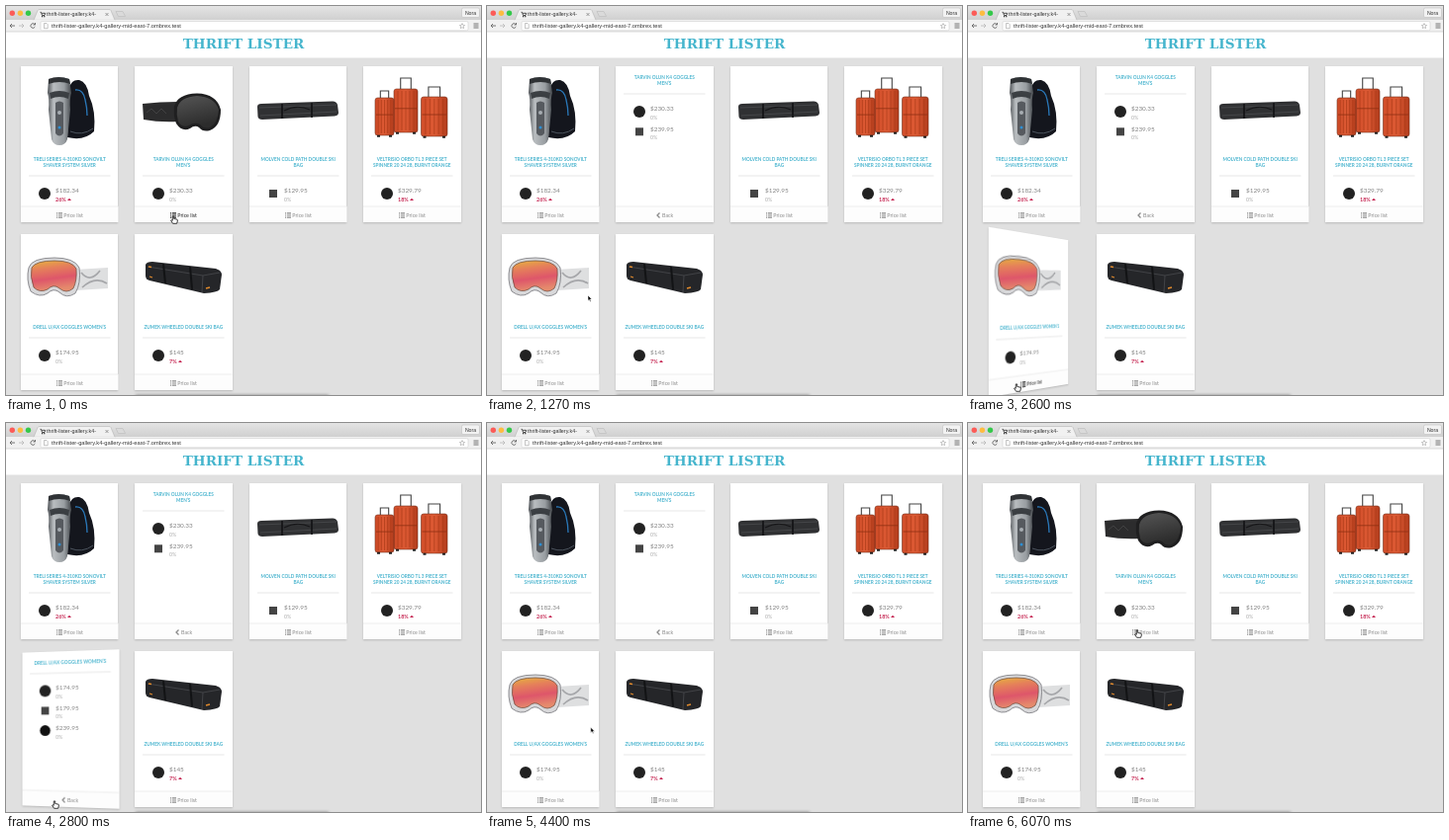
An HTML page for the animation above (6140 ms loop, 480 by 394 pixels).

```html
<!DOCTYPE html>
<html lang="en">
<head>
<meta charset="utf-8">
<title>Thrift Lister</title>
<style>
html, body { margin: 0; width: 100%; height: 100%; overflow: hidden; background: #e0e0e0; }
#stage { position: relative; width: 480px; height: 394px; overflow: hidden; }
svg { position: absolute; left: 0; top: 0; overflow: visible; }
.card { position: absolute; width: 98.5px; height: 158px; background: #fff; box-shadow: 0 .5px 2px rgba(0,0,0,.18); }
text { font-family: Lato, "Open Sans", sans-serif; }
.ui { font-family: "Liberation Sans", sans-serif; fill: #333; }
.head { font: bold 13.6px "DejaVu Serif", serif; fill: #45b5cd; text-anchor: middle; }
.name { font-size: 4.7px; font-weight: bold; fill: #4bb5cf; text-anchor: middle; }
.price { font-size: 6.4px; fill: #808080; }
.same { font-size: 5.2px; fill: #aaa; }
.up { font-size: 5.4px; font-weight: bold; fill: #c4224f; }
.link { fill: #8a8a8a; stroke: #8a8a8a; }
.link text { font-size: 5.3px; stroke: none; }
.hot .link { fill: #222; stroke: #222; }
</style>
</head>
<body>
<div id="stage">
<svg id="chrome" width="480" height="394">
  <defs>
    <linearGradient id="bar" x2="0" y2="1"><stop stop-color="#e4e4e4"/><stop offset="1" stop-color="#d0d0d0"/></linearGradient>
    <linearGradient id="steel"><stop stop-color="#4f5357"/><stop offset=".25" stop-color="#b9bdc0"/><stop offset=".7" stop-color="#989da1"/><stop offset="1" stop-color="#44484c"/></linearGradient>
    <linearGradient id="smoke" x2=".3" y2="1"><stop stop-color="#555"/><stop offset="1" stop-color="#2c2c2c"/></linearGradient>
    <linearGradient id="sunset" x2=".2" y2="1"><stop stop-color="#e6b43c"/><stop offset=".3" stop-color="#e5805a"/><stop offset=".65" stop-color="#de566a"/><stop offset="1" stop-color="#e58a6c"/></linearGradient>
    <linearGradient id="shell"><stop stop-color="#cf4c28"/><stop offset=".5" stop-color="#dd5a34"/><stop offset="1" stop-color="#b23c1c"/></linearGradient>
  </defs>
  <rect width="480" height="14" fill="url(#bar)"/>
  <rect y="14" width="480" height="12" fill="#f1f1f1"/>
  <rect y="26" width="480" height="26.500" fill="#fff"/>
  <path d="M0 26h480" stroke="#c4c4c4" stroke-width=".6"/>
  <circle cx="6.300" cy="7.200" r="2.700" fill="#fc5b57"/>
  <circle cx="14.400" cy="7.200" r="2.700" fill="#fdbc40"/>
  <circle cx="22.500" cy="7.200" r="2.700" fill="#34c84a"/>
  <path d="M28 14.300L32 4.500Q32.500 3.500 34 3.500H104Q105.500 3.500 106 4.500L110 14.300Z" fill="#f1f1f1" stroke="#aaa" stroke-width=".5"/>
  <path d="M28 14.500H110" stroke="#f1f1f1"/>
  <path d="M111 5.500h7l2.500 5h-7z" fill="#dadada" stroke="#b5b5b5" stroke-width=".5"/>
  <path d="M34.500 6.300h1l1 3.200h2.500l.7-2.200h-3.500" fill="none" stroke="#222" stroke-width=".8"/>
  <circle cx="36.600" cy="10.700" r=".6"/><circle cx="38.800" cy="10.700" r=".6"/>
  <text class="ui" x="41" y="10.400" font-size="5.400">thrift-lister-gallery.k4-</text>
  <path d="M100.500 7l3 3m0-3l-3 3" stroke="#777" stroke-width=".7"/>
  <rect x="460.500" y="2" width="18" height="9.500" rx="1.500" fill="#f2f2f2" stroke="#b8b8b8" stroke-width=".5"/>
  <text class="ui" x="469.500" y="8.700" font-size="5.200" text-anchor="middle">Nora</text>
  <g fill="none" stroke="#666" stroke-width=".9">
    <path d="M9 20H4m2-2l-2 2l2 2"/>
    <path d="M13 20h5m-2-2l2 2l-2 2" stroke="#bbb"/>
    <path d="M29 18.500A2.300 2.300 0 1 0 29.300 21M29.500 17v2h-2"/>
    <path d="M472.500 18h5m-5 2h5m-5 2h5"/>
  </g>
  <rect x="35" y="15.500" width="432" height="9.300" rx="1.500" fill="#fff" stroke="#c6c6c6" stroke-width=".5"/>
  <path d="M38.500 17.500h2.500l1.200 1.200v4h-3.700z" fill="#fff" stroke="#888" stroke-width=".5"/>
  <text class="ui" x="46" y="22.200" font-size="5.750">thrift-lister-gallery.k4-gallery-mid-east-7.ombrex.test</text>
  <path d="M461 17.600l.8 1.700 1.800.2-1.300 1.300.3 1.800-1.600-.9-1.600.9.3-1.800-1.300-1.300 1.800-.2z" fill="none" stroke="#888" stroke-width=".5"/>
  <text class="head" x="240" y="42.600">THRIFT LISTER</text>
</svg>
<div id="cards"></div>
<svg width="480" height="394">
  <path d="M131 395h195" stroke="#777" stroke-width="2" style="filter: blur(1.500px)"/>
  <g id="cursor" stroke="#fff" stroke-width=".6" stroke-linejoin="round">
    <path id="arrow" d="M0 0V5.500L1.300 4.400L2.200 6.400L3.200 6L2.300 4H4Z" fill="#000"/>
    <path id="hand" d="M-.7 0Q0-.7.7 0V2.500L4 3.200Q4.600 3.600 4.300 5L3.600 7.300H-.4L-2.400 4.200Q-2.200 3.300-.7 4.300Z" fill="#fff" stroke="#111" stroke-width=".8"/>
  </g>
</svg>
</div>
<script>
const LOOP = 6140, FLIP = 350;

const suitcase = (x, y, w, h, grip) => {
  let ribs = '';
  for (let i = 1; i < 6; i++) ribs += `M${x + w * i / 6} ${y + 2}v${h - 4}`;
  return `<path d="M${x + w * .28} ${y}v${-grip}h${w * .44}v${grip}" fill="none" stroke="#444" stroke-width="1.100"/>
    <rect x="${x}" y="${y}" width="${w}" height="${h}" rx="2.500" fill="url(#shell)" stroke="#74301c" stroke-width=".6"/>
    <path d="${ribs}" stroke="#a93a18" stroke-width=".7"/>
    <path d="M${x + 1} ${y + h * .45}h${w - 2}" stroke="#8e2f12" stroke-width=".8"/>
    <path d="M${x + 2} ${y + h + .8}h3m${w - 10} 0h3" stroke="#222" stroke-width="2"/>`;
};

const art = {
  shaver: `<path d="M49 22Q51 13 59 14Q67 16 69 30Q76 45 74 66Q64 76 47 72Z" fill="#14161d"/>
    <path d="M55 24Q63 23 65 34Q67 42 67 50" fill="none" stroke="#2a78b8" stroke-width="1.300"/>
    <path d="M50 66Q62 71 73 63" fill="none" stroke="#4c545e"/>
    <path d="M28 13Q38 9 49 13L51 27Q49 33 50 44L47 74Q45 80 39 80Q33 80 31 74L28 44Q29 33 27 27Z" fill="url(#steel)"/>
    <path d="M28 13Q38 9 49 13L50 18Q39 14 28 18Z" fill="#303336"/>
    <path d="M29 27Q39 23 49 27L48 33Q39 29 30 33Z" fill="#3b3f43"/>
    <path d="M35 37Q39 34 43 37L43 68Q39 73 35 68Z" fill="#565a5f"/>
    <circle cx="39" cy="47" r="2" fill="#a7adb2"/><circle cx="39" cy="62" r="1.500" fill="#2d8fd4"/>`,
  dark: `<path d="M8 38Q25 36 44 36V56Q25 57 9 54Z" fill="#2c2c2d"/>
    <path d="M12 47l5-4 5 5 5-5 5 5" fill="none" stroke="#424243"/>
    <path d="M40 41Q43 28 63 27.500Q83 28 87 44Q87 61 76 65Q69 67 65 62Q61 59 56 63Q48 67 42 58Q39 50 40 41Z" fill="#1f1f20"/>
    <path d="M43 42Q46 31 63 30Q81 31 85 44Q84 58 76 62Q70 64 66 59Q61 56 55 60Q48 63 44 56Q42 49 43 42Z" fill="url(#smoke)"/>`,
  flatBag: `<path d="M8 41Q8 38 12 38L84 35.500Q88 35.500 89 39L90 47Q90 50 86 50.500L13 54Q9 54 8.500 51Z" fill="#303133"/>
    <path d="M10 42L88 39M11 50L88 46" stroke="#505154" stroke-width=".7"/>
    <path d="M33 38v15M63 37v15" stroke="#161618" stroke-width="1.800"/>
    <path d="M35 45Q48 38 61 44" fill="none" stroke="#161618" stroke-width="1.200"/>`,
  cases: suitcase(31, 23, 24, 44, 11) + suitcase(12, 32, 19, 38, 7) + suitcase(58.5, 31, 26.5, 40, 10),
  bright: `<path d="M55 36L88 34V55L56 57Z" fill="#dedfe0"/>
    <path d="M61 39Q70 50 80 37M62 54Q75 42 87 50" fill="none" stroke="#a5a6a9" stroke-width="1.700"/>
    <path d="M8 34Q11 24 34 24Q54 24 59 34Q61 50 55 60Q46 66 39 59Q33 54 27 60Q19 65 10 58Q5 46 8 34Z" fill="#d8d8da" stroke="#77777b" stroke-width=".8"/>
    <path d="M11 34Q15 27 34 27Q52 27 56 35Q57 47 53 55Q46 61 39 55Q33 50 27 56Q19 60 13 54Q9 43 11 34Z" fill="url(#sunset)" stroke="#6b4a3c" stroke-width=".7"/>`,
  wheelBag: `<path d="M11 31Q12 28 18 28L82 35Q88 37 88 41L86 56Q84 59 70 60L15 47Q11 46 11 42Z" fill="#252629"/>
    <path d="M13 33L69 42L86 39M69 42L68 59" fill="none" stroke="#4a4b4f" stroke-width=".8"/>
    <path d="M29 30L31 50M56 33L58 56" stroke="#121315" stroke-width="2"/>
    <path d="M14 33l3 .5M15 43l3 1M72 55l4-1" stroke="#e08a2c" stroke-width="1.300"/>`
};

// Shop marks: plain shapes
const shops = [
  y => `<circle cx="24" cy="${y}" r="6" fill="#222"/>`,
  y => `<rect x="20" y="${y - 4}" width="8" height="8" fill="#444"/>`,
  y => `<circle cx="24" cy="${y}" r="5.500" fill="#111"/>`
];

// Offers: [shop, price, rise in percent]
const goods = [
  { art: 'shaver', name: ['TRELI SERIES 4-310KD SONOVILT', 'SHAVER SYSTEM SILVER'], offers: [[0, '182.34', 26]] },
  { art: 'dark', name: ['TARVIN OLUN K4 GOGGLES', 'MEN’S'], offers: [[0, '230.33', 0], [1, '239.95', 0]],
    flips: [640, 5400], hover: [[0, 743], [4640, 5503]] },
  { art: 'flatBag', name: ['MOLVEN COLD PATH DOUBLE SKI', 'BAG'], offers: [[1, '129.95', 0]] },
  { art: 'cases', name: ['VELTRISIO ORBO TL 3 PIECE SET', 'SPINNER 20 24 28, BURNT ORANGE'], offers: [[0, '329.79', 18]] },
  { art: 'bright', name: ['DRELL U/AX GOGGLES WOMEN’S'], offers: [[0, '174.95', 0], [1, '179.95', 0], [2, '239.95', 0]],
    flips: [2546, 4016], hover: [[1720, 2649], [3400, 4119]] },
  { art: 'wheelBag', name: ['ZUMEK WHEELED DOUBLE SKI BAG'], offers: [[0, '145', 7]] }
];

const text = (x, y, cls, s) => `<text x="${x}" y="${y}" class="${cls}">${s}</text>`;

function offer([shop, price, rise], y) {
  const caret = rise ? `<path d="M${rise > 9 ? 47 : 44} ${y + 10}l2-2.200 2 2.200z" fill="#c4224f"/>` : '';
  return shops[shop](y + 3) + text(35, y + 2.300, 'price', '$' + price)
    + text(35, y + 11, rise ? 'up' : 'same', rise + '%') + caret;
}

function face(g, back) {
  const top = back ? 11 : 94, rule = top + 5 + 6 * g.name.length;
  const offers = back ? g.offers : g.offers.slice(0, 1);
  const link = back
    ? '<path d="M44.500 148.500l-2.500 2.500 2.500 2.500" fill="none" stroke-width="1.300"/>' + text(47, 153, '', 'Back')
    : '<path d="M36 148.800h1.200m.8 0h4M36 151h1.200m.8 0h4M36 153.200h1.200m.8 0h4" stroke-width="1.200"/>' + text(43.300, 153, '', 'Price list');
  return `<svg width="98.500" height="158">${back ? '' : art[g.art]}
    ${g.name.map((s, i) => text(49.250, top + 1.700 + 6 * i, 'name', s)).join('')}
    <path d="M8 ${rule}h82.500" stroke="#ddd" stroke-width=".7"/>
    ${offers.map((o, i) => offer(o, rule + 15 + 20.300 * i)).join('')}
    <path d="M0 142h98.500v16h-98.500z" fill="#fdfdfd"/>
    <path d="M0 142h98.500" stroke="#e6e6e6" stroke-width=".7"/>
    <g class="link">${link}</g></svg>`;
}

const $ = id => document.getElementById(id);
goods.forEach((g, i) => {
  g.el = document.createElement('div');
  g.el.className = 'card';
  g.el.style.left = 14.700 + 115.500 * (i % 4) + 'px';
  g.el.style.top = (i < 4 ? 61 : 231) + 'px';
  g.el.innerHTML = face(g, false) + (g.flips ? face(g, true) : '');
  $('cards').append(g.el);
});

// CSS "ease" curve, solved by bisection
function ease(x) {
  if (x <= 0) return 0;
  if (x >= 1) return 1;
  const curve = (a, b, s) => 3 * a * s * (1 - s) ** 2 + 3 * b * s * s * (1 - s) + s ** 3;
  let lo = 0, hi = 1;
  for (let i = 0; i < 20; i++) {
    const mid = (lo + hi) / 2;
    if (curve(.25, .25, mid) < x) lo = mid; else hi = mid;
  }
  return curve(.1, 1, lo);
}

// Pointer stops: [time, x, y]
const stops = [[0, 169, 213], [930, 169, 213], [1270, 102, 293], [1750, 49, 383], [3400, 49, 383], [3800, 56, 380],
  [4200, 56, 380], [4650, 172, 209], [5800, 172, 209], [6070, 171, 210], [LOOP, 169, 213]];

function pointer(t) {
  const i = stops.findIndex(s => s[0] > t), [t0, x0, y0] = stops[i - 1], [t1, x1, y1] = stops[i];
  const u = (t - t0) / (t1 - t0), k = u * u * (3 - 2 * u);
  return [x0 + (x1 - x0) * k, y0 + (y1 - y0) * k];
}

function draw(now) {
  const t = now % LOOP;
  for (const g of goods) {
    if (!g.flips) continue;
    const [out, home] = g.flips.map(s => ease((t - s) / FLIP));
    const angle = 180 * (out - home), back = angle > 90;
    const turn = back ? angle - 180 : angle;
    g.el.style.transform = turn ? `perspective(345px) rotateY(${turn}deg)` : 'none';
    g.el.children[0].style.display = back ? 'none' : '';
    g.el.children[1].style.display = back ? '' : 'none';
    g.el.classList.toggle('hot', g.hover.some(([a, b]) => t >= a && t < b));
  }
  const [x, y] = pointer(t), onLink = y > 204 && y < 219 || y > 374;
  $('cursor').setAttribute('transform', `translate(${x} ${y})`);
  $('hand').style.display = onLink ? '' : 'none';
  $('arrow').style.display = onLink ? 'none' : '';
}

const start = performance.now();
(function tick() {
  draw(Math.max(0, performance.now() - start));
  requestAnimationFrame(tick);
})();
</script>
</body>
</html>
```
